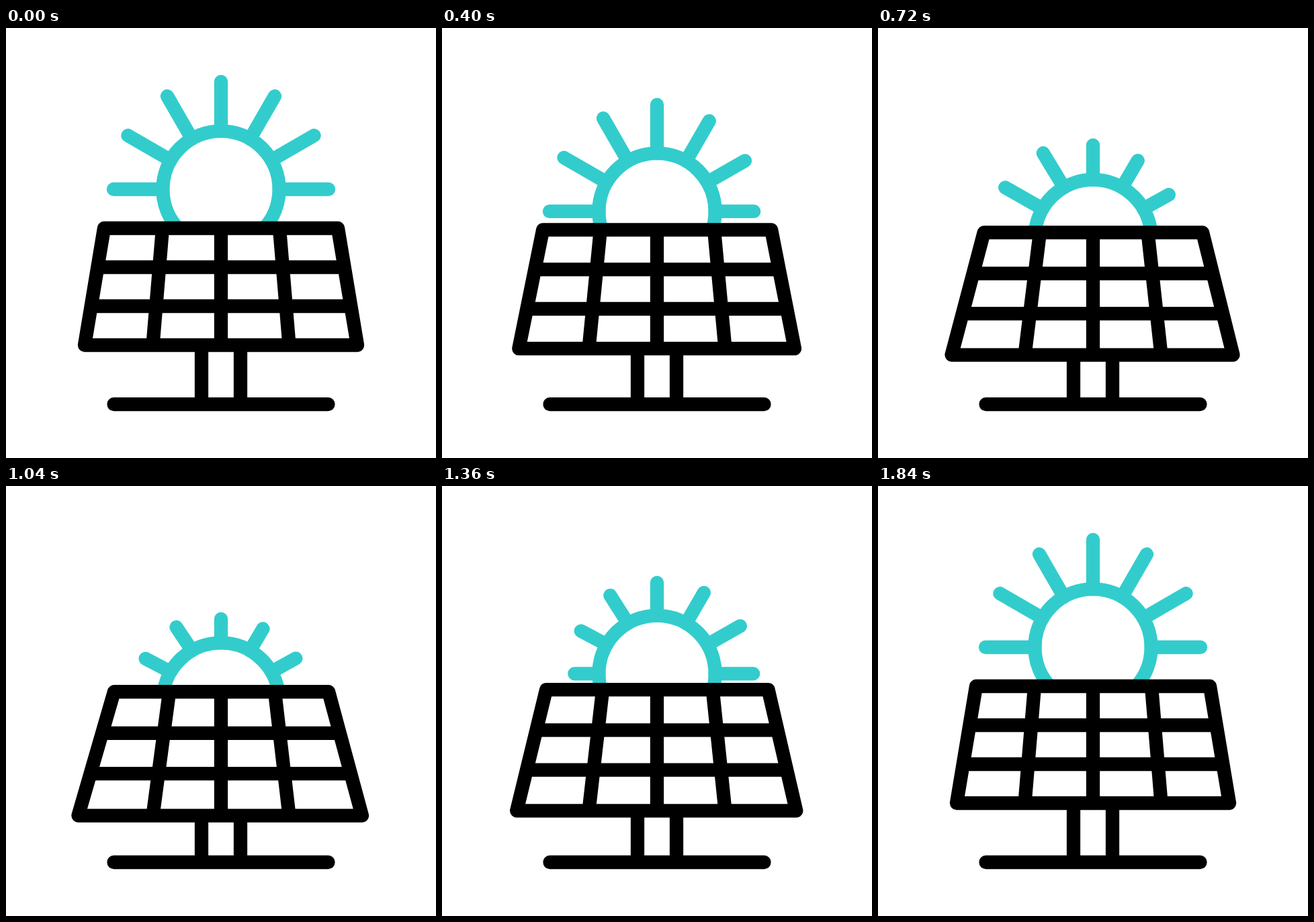
Recreate the animation shown at these times as an HTML page. Size 640 by 640 pixels, loop 2000 ms.

```html
<!DOCTYPE html>
<html lang="en">
<head>
<meta charset="utf-8">
<title>Solar panel</title>
<style>
  html, body { margin: 0; width: 100%; height: 100%; overflow: hidden; background: #fff; }
  svg { display: block; width: 100vw; height: 100vh; }
</style>
</head>
<body>
<svg viewBox="0 0 640 640" fill="none" stroke-width="20.3" stroke-linejoin="round">
  <clipPath id="horizon"><rect id="sky" width="640" height="298"/></clipPath>
  <g clip-path="url(#horizon)">
    <g id="sun" stroke="#33cccc">
      <circle r="86.6"/>
      <path id="rays" stroke-linecap="round"/>
    </g>
  </g>
  <g stroke="#000">
    <path id="frame"/>
    <path id="grid"/>
    <path id="posts"/>
    <path d="M160.5 560H479.5" stroke-linecap="round"/>
  </g>
</svg>
<script>
const LOOP = 2000, STEP = 40, START = 80, END = 1840, TURN = 1000;
const RING = 86.6, REACH = 160, STAGGER = 80, SHRINK = 720;

// How far each ray tip is pulled in, from right to left.
const PULL = [[-38, 0], [-29.5, 18], [-18, 31.8], [0, 38], [14, 29.7], [30, 19.5], [39.5, 0]];

const $ = id => document.getElementById(id);
const mix = (a, b, p) => a + (b - a) * p;
const set = (id, name, value) => $(id).setAttribute(name, value);

// Bezier ease (1/3, 0, settle, 1); the default is a plain smoothstep.
function ease(u, settle = 2 / 3) {
  if (u <= 0) return 0;
  if (u >= 1) return 1;
  let low = 0, high = 1;
  for (let i = 0; i < 24; i++) {
    const s = (low + high) / 2, r = 1 - s;
    if (r * r * s + 3 * r * s * s * settle + s * s * s < u) low = s;
    else high = s;
  }
  return low * low * (3 - 2 * low);
}

// Goes from 0 to 1 at the turn and back to 0 at the end.
function swing(t, start, turn, settleOut, settleBack) {
  return t < turn
    ? ease((t - start) / (turn - start), settleOut)
    : 1 - ease((t - turn) / (END - turn), settleBack);
}

function rayPath(t) {
  return PULL.map(([dx, dy], i) => {
    const angle = i * Math.PI / 6, x = Math.cos(angle), y = -Math.sin(angle);
    const start = START + STAGGER * i;
    const p = swing(t, start, start + SHRINK);
    return `M${x * RING} ${y * RING}L${x * REACH + dx * p} ${y * REACH + dy * p}`;
  }).join("");
}

function draw(t) {
  const sink = 80.5 * swing(t, START, TURN, 0.385, 0.46);
  set("sun", "transform", `translate(320 ${240 + sink})`);
  set("rays", "d", rayPath(t));

  const tilt = swing(t, START, TURN);
  const top = mix(298, 306.3, tilt), bottom = mix(472, 490.7, tilt);
  const topLeft = mix(146, 161, tilt), topRight = mix(494, 480, tilt);
  const lowLeft = mix(117, 107.4, tilt), lowRight = mix(523, 530, tilt);
  set("sky", "height", top);
  set("frame", "d", `M${topLeft} ${top}H${topRight}L${lowRight} ${bottom}H${lowLeft}Z`);

  const row = y => {
    const k = (y - top) / (bottom - top);
    return `M${mix(topLeft, lowLeft, k)} ${y}H${mix(topRight, lowRight, k)}`;
  };
  const column = (x, foot) => `M${x} ${top}L${foot} ${bottom}`;
  set("grid", "d",
    row(mix(356, 368, tilt)) + row(mix(414, 428.3, tilt)) +
    column(mix(233, 243.2, tilt), 218.5) + column(320, 320) +
    column(mix(407, 400, tilt), 421.5));
  set("posts", "d", `M291 ${bottom}V560M349 ${bottom}V560`);
}

const began = performance.now();
function tick() {
  const t = (performance.now() - began) % LOOP;
  draw(Math.floor(t / STEP) * STEP);
  requestAnimationFrame(tick);
}
tick();
</script>
</body>
</html>
```
